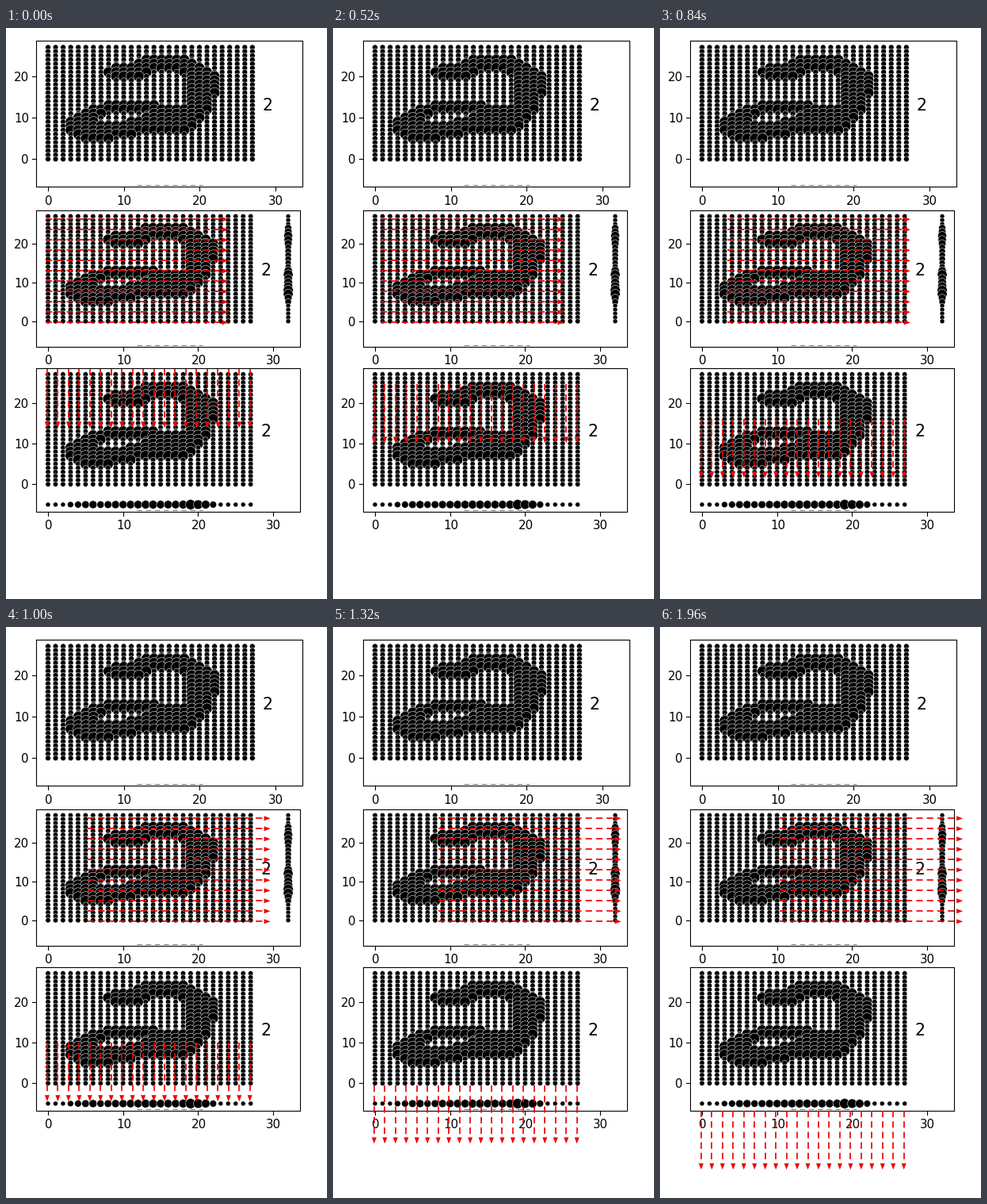
A matplotlib script for the animation above (2000 ms loop, 405x720 px).

```python
import numpy as np
import matplotlib.pyplot as plt
from matplotlib.animation import FuncAnimation
from matplotlib.collections import LineCollection, PolyCollection

W, H, DPI = 405, 720, 72
FRAMES, STEP = 50, 40
RED = "#f00000"
N = 28
SHIFT = 0.7

plt.rcParams["font.family"] = "DejaVu Sans"
fig = plt.figure(figsize=(W / DPI, H / DPI), dpi=DPI, facecolor="white")
ax = fig.add_axes([0, 0, 1, 1])
ax.set(xlim=(SHIFT, W + SHIFT), ylim=(H + SHIFT, SHIFT))
ax.axis("off")


def brush(points, radius):
    """Mark the grid cells within a radius of a polyline."""
    px, py = np.array(points).T
    t = np.linspace(0, len(px) - 1, 400)
    x = np.interp(t, np.arange(len(px)), px)
    y = np.interp(t, np.arange(len(py)), py)
    rows, cols = np.mgrid[0:N, 0:N]
    gap = np.hypot(cols[..., None] - x, rows[..., None] - y)
    return gap.min(axis=-1) <= radius


# The handwritten two: a thick hook and a thinner loop over its foot
hook = [(9.5, 21), (11, 21), (14, 22.9), (17, 23), (19.3, 21.6), (20.5, 20),
        (20.5, 16), (19.4, 12), (17.8, 8.5), (13, 8.5), (10, 7), (8, 6.5),
        (5.3, 6.5), (4, 8), (4.6, 9.5)]
loop = [(5, 10), (6.5, 11.5), (9, 12.5), (13, 12.5), (15, 11.5), (18, 11.5)]
ink = brush(hook, 1.55) | brush(loop, 1.0)


def dots(x, y, diameter):
    ax.scatter(x, y, s=np.square(diameter), c="black", edgecolors="white",
               linewidths=0.5, zorder=2)


def panel(box, origin, unit, label_y, small, two_x):
    """Draw one framed plot and return its data-to-pixel mapping."""
    left, top, right, bottom = box

    def to_px(x, y):
        return origin[0] + unit[0] * x, origin[1] - unit[1] * y

    ax.plot([left, right, right, left, left],
            [top, top, bottom, bottom, top], color="black", lw=1.1)
    for v in (0, 10, 20, 30):
        x, y = to_px(v, v)
        ax.plot([x, x], [bottom, bottom + 5], color="black", lw=1.1)
        ax.text(x + SHIFT, label_y, str(v), size=15, ha="center",
                va="center_baseline")
        if v < 30:
            ax.plot([left - 5, left], [y, y], color="black", lw=1.1)
            ax.text(29 + SHIFT, y, str(v), size=15, ha="right",
                    va="center_baseline")

    rows, cols = np.mgrid[N - 1:-1:-1, 0:N]
    rows, cols = rows.ravel(), cols.ravel()
    dots(*to_px(cols, rows), np.where(ink[rows, cols], 13.4, small))
    ax.text(two_x, to_px(0, 12)[1] + 1, "2", size=20.5, zorder=3)

    # Cut-off remains of a line of text
    ax.plot([166, 249], [bottom - 1.7] * 2, color="#555555", lw=0.8,
            dashes=(8, 6))
    return to_px


panel((38.5, 16.5, 374.5, 200.5), (53.7, 166), (9.55, 5.22), 217.5, 6.8, 324.5)
mid = panel((38.5, 230.5, 371.5, 402.5), (53.7, 370.5), (9.47, 4.9),
            418.5, 6.4, 322)
low = panel((38.5, 429.5, 371.5, 610.5), (53.7, 576), (9.47, 5.13),
            627, 6.4, 322)

# Row and column sums, drawn as dot sizes
k = np.arange(N)
dots(*mid(np.full(N, 32), k[::-1]), np.sqrt(36 + 7 * ink.sum(1)[::-1]))
dots(*low(k, np.full(N, -5)), np.sqrt(36 + 8 * ink.sum(0)))

shafts = LineCollection([], colors=RED, linewidths=1.7,
                        linestyles=[(0, (4.8, 3))], zorder=5)
heads = PolyCollection([], facecolors=RED, edgecolors="none", zorder=5)
ax.add_collection(shafts, autolim=False)
ax.add_collection(heads, autolim=False)

ROW_Y = np.linspace(242, 372, 11)
COL_X = np.linspace(52.6, 308.4, 20)
HEAD, HALF = 8, 3


def arrow(tip, along, length):
    """Shaft and triangular head of an arrow pointing along a unit vector."""
    tip, along = np.array(tip), np.array(along)
    side = along[::-1] * HALF
    base = tip - along * HEAD
    return [tip - along * length, base], [tip, base + side, base - side]


def ease(ms):
    u = np.clip((ms - 126) / 1710, 0, 1)
    return 2 * u * u if u < 0.5 else 1 - 2 * (1 - u) ** 2


def draw(i):
    p = ease(i * STEP)
    parts = [arrow((281.3 + 101.5 * p, y), (1, 0), 231) for y in ROW_Y]
    parts += [arrow((x, 505 + 180 * p), (0, 1), 74) for x in COL_X]
    lines, tips = zip(*parts)
    shafts.set_segments(lines)
    heads.set_verts(tips)
    return shafts, heads


anim = FuncAnimation(fig, draw, frames=FRAMES, interval=STEP,
                     repeat=True, repeat_delay=0)
plt.show()
```
